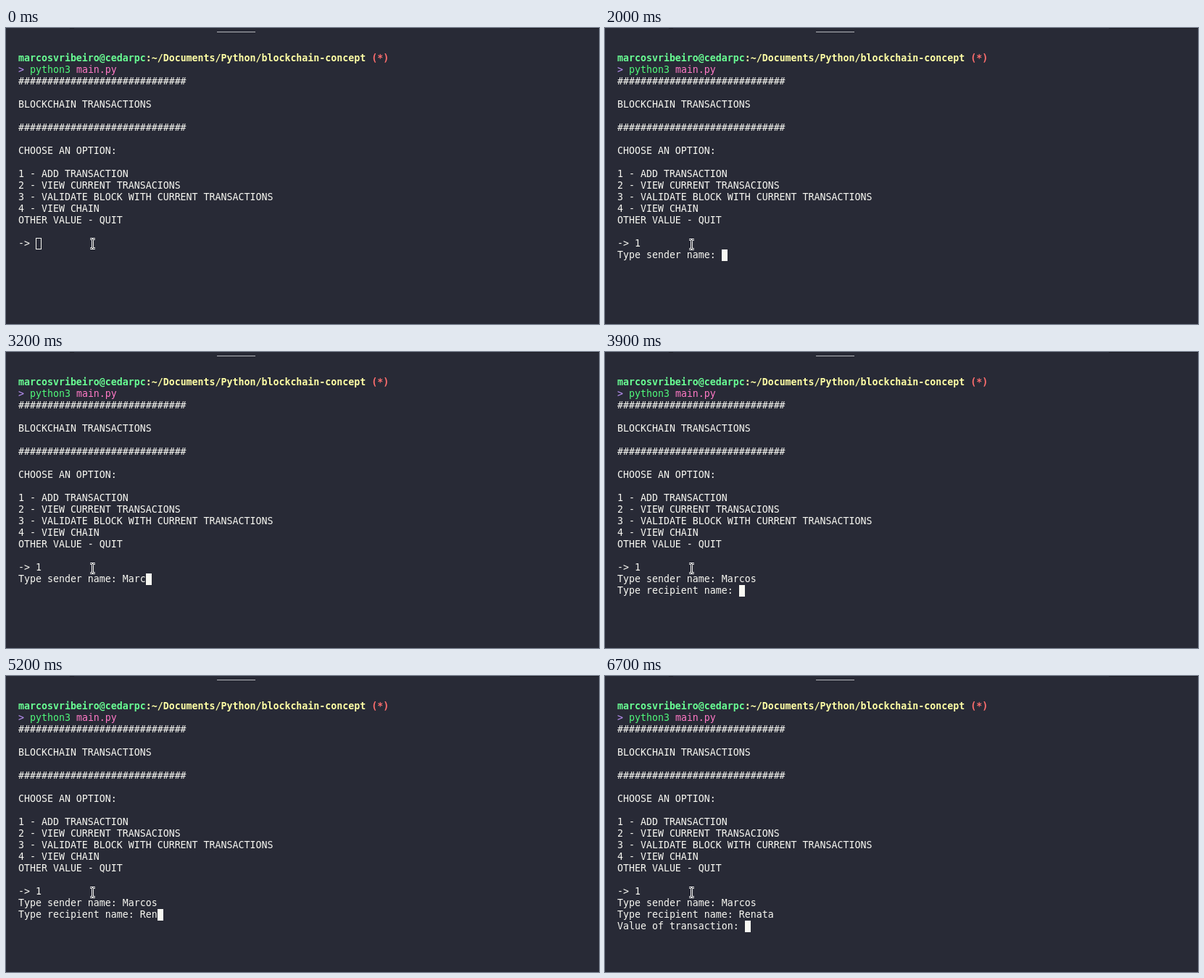
Animation of 818x409 px, one loop 8 s. Source, as an HTML page:

```html
<!DOCTYPE html>
<html lang="en">
<head>
<meta charset="utf-8">
<title>Blockchain terminal</title>
<style>
  html, body { margin: 0; width: 100%; height: 100%; overflow: hidden; background: #282a36; }
  #stage { position: relative; width: 818px; height: 409px; overflow: hidden; background: #282a36; }
  #stage > * { position: absolute; }
  /* 13.288px gives an 8px character cell */
  pre {
    left: 17px; top: 34px; margin: 0; color: #f8f8f2;
    font: 13.288px/16px "DejaVu Sans Mono", monospace;
    font-variant-ligatures: none;
  }
  b { font-weight: 700; }
  .user { color: #69ff94; }
  .path { color: #ffffa5; }
  .git { color: #ff6e6e; }
  .mark { color: #bd93f9; }
  .cmd { color: #50fa7b; }
  .arg { color: #ff79c6; }
  .tab { left: 291px; top: 5px; width: 53px; height: 1px; background: #b4b5ba; }
  .edge { top: 0; height: 1px; background: #1b1c24; }
  #caret { box-sizing: border-box; width: 8px; height: 16px; border: 1px solid #f8f8f2; }
  #mouse { left: 115px; top: 291px; }
</style>
</head>
<body>
<div id="stage">
  <div class="edge" style="left:88px;width:6px"></div>
  <div class="edge" style="left:695px;width:123px"></div>
  <div class="tab"></div>
  <pre><b class="user">marcosvribeiro@cedarpc</b><b class="path">:~/Documents/Python/blockchain-concept</b> <b class="git">(*)</b>
<span class="mark">&gt;</span> <span class="cmd">python3</span> <span class="arg">main.py</span>
#############################

BLOCKCHAIN TRANSACTIONS

#############################

CHOOSE AN OPTION:

1 - ADD TRANSACTION
2 - VIEW CURRENT TRANSACIONS
3 - VALIDATE BLOCK WITH CURRENT TRANSACTIONS
4 - VIEW CHAIN
OTHER VALUE - QUIT

<span id="session"></span></pre>
  <div id="caret"></div>
  <svg id="mouse" width="9" height="16" fill="none">
    <path id="beam" d="M1.5 1.5H3.5L4.5 2.5L5.5 1.5H7.5M4.5 2.5V13.5M1.5 14.5H3.5L4.5 13.5L5.5 14.5H7.5" stroke="#fff" stroke-width="3"/>
    <use href="#beam"/>
    <path d="M1.5 1.5H3.5L4.5 2.5L5.5 1.5H7.5M4.5 2.5V13.5M1.5 14.5H3.5L4.5 13.5L5.5 14.5H7.5" stroke="#15161c"/>
  </svg>
</div>
<script>
const LOOP = 8000, LEFT = 17, TOP = 290, CELL = 8, ROW = 16;
const MOVE = 300, FOCUS = 400;

// [time in ms, text that appears]
const output = [
  [0, "-> "], [1300, "1"],
  [2000, "\nType sender name: "],
  [2800, "M"], [3000, "a"], [3100, "r"], [3200, "c"], [3300, "o"], [3400, "s"],
  [3900, "\nType recipient name: "],
  [4700, "R"], [4900, "e"], [5200, "n"], [5700, "a"], [5800, "t"], [6400, "a"],
  [6700, "\nValue of transaction: "]
];

const [session, caret, mouse] =
  ["session", "caret", "mouse"].map(id => document.getElementById(id));
let shown = null;

function draw(t) {
  const text = output.filter(([at]) => at <= t).map(step => step[1]).join("");
  if (text !== shown) session.textContent = shown = text;

  const lines = text.split("\n");
  caret.style.left = LEFT + lines.at(-1).length * CELL + "px";
  caret.style.top = TOP + (lines.length - 1) * ROW + "px";
  caret.style.background = t < FOCUS ? "none" : "#f8f8f2";
  mouse.style.top = (t < MOVE ? 290 : 291) + "px";
}

const start = performance.now();
function tick() {
  draw((performance.now() - start) % LOOP);
  requestAnimationFrame(tick);
}
draw(0);
requestAnimationFrame(tick);
</script>
</body>
</html>
```
